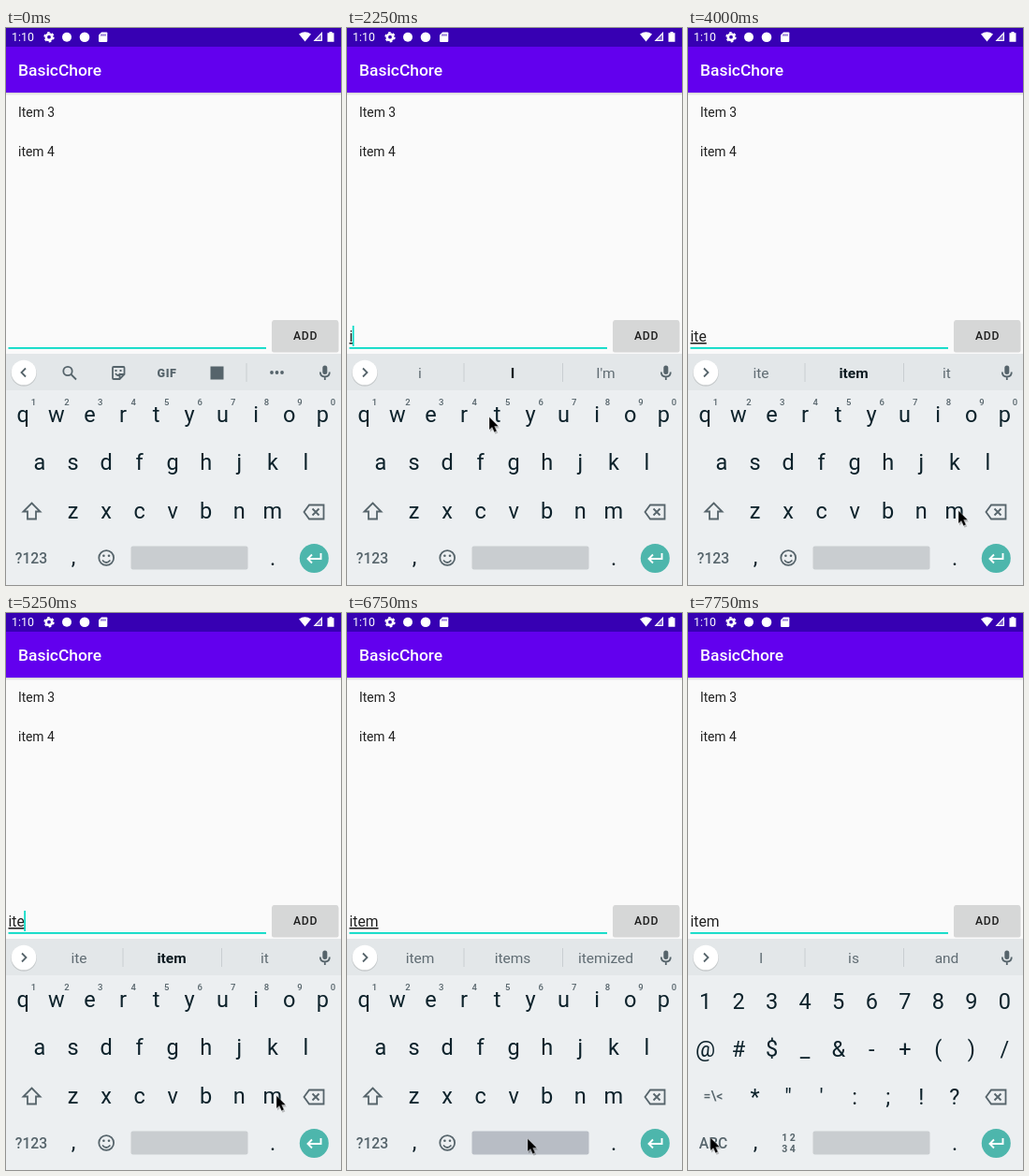
Recreate the animation shown at these times as an HTML page. Size 358 by 595 pixels, loop 8 s.

```html
<!DOCTYPE html>
<html lang="en">
<head>
<meta charset="utf-8">
<title>Todo list</title>
<style>
  html, body { margin: 0; width: 100%; height: 100%; overflow: hidden; background: #fafafa; }
  svg { display: block; width: 100%; height: 100%; font-family: Roboto, sans-serif; }
  .line { fill: none; stroke: #56646b; stroke-width: 1.8; }
  .grey { fill: #56646b; }
  .mid { text-anchor: middle; }
  .key { font-size: 23.5px; fill: #0d222b; }
</style>
</head>
<body>
<svg viewBox="0 0 358 595">
  <defs>
    <linearGradient id="fade" x2="0" y2="1">
      <stop stop-opacity=".16"/><stop offset="1" stop-opacity="0"/>
    </linearGradient>
  </defs>
  <rect width="358" height="595" fill="#fafafa"/>

  <!-- status bar and title -->
  <rect width="358" height="20" fill="#3700b3"/>
  <rect y="20" width="358" height="49" fill="#6200ee"/>
  <rect y="69" width="358" height="3" fill="url(#fade)"/>
  <g fill="#fff">
    <text x="6" y="14" font-size="12.4">1:10</text>
    <circle cx="46" cy="9.7" r="3.2" fill="none" stroke="#fff" stroke-width="2.6"/>
    <circle cx="46" cy="9.7" r="4.9" fill="none" stroke="#fff" stroke-width="1.6" stroke-dasharray="2.6 2.53"/>
    <circle cx="65" cy="9.7" r="5"/>
    <circle cx="84" cy="9.7" r="5.3"/>
    <path d="M102 4.5h5.5q.8 0 .8.8v8.8q0 .8-.8.8h-7.7q-.8 0-.8-.8V7.5z"/>
    <path d="M102 6.5v2m2-2v2m2-2v2" stroke="#3700b3"/>
    <path d="M313 6.5q6.5-4.6 13 0L319.500 14.500z"/>
    <path d="M338 4v10h-9.500z" fill-opacity=".35"/>
    <path d="M338 4v10h-9.500zM336.800 7v5.800h-5.500z" fill-rule="evenodd"/>
    <path d="M343.500 5.200h2V4h3v1.200h2v9.600h-7z"/>
    <text x="13" y="51" font-size="17.4" font-weight="500">BasicChore</text>
  </g>

  <!-- list, input and button -->
  <g font-size="13.9" fill="#202020">
    <text x="13" y="95">Item 3</text>
    <text x="13" y="137">item 4</text>
  </g>
  <text id="typed" x="2.500" y="335" font-size="15.700" fill="#202020"></text>
  <rect x="2.500" y="341" width="275.500" height="1.800" fill="#03dac5"/>
  <rect id="caret" y="318" width="1.700" height="22" fill="#03dac5"/>
  <rect x="284" y="313" width="71.500" height="33.500" rx="2" fill="#000" opacity=".14"/>
  <rect x="284.500" y="312" width="70.500" height="33" rx="2" fill="#d6d7d7"/>
  <text class="mid" x="320" y="332.500" font-size="12.200" font-weight="500" letter-spacing=".7" fill="#202020">ADD</text>

  <!-- keyboard -->
  <rect y="348" width="358" height="247" fill="#eceff1"/>
  <rect y="348" width="358" height="39" fill="#e3e7e9"/>
  <circle cx="19" cy="369" r="13.700" fill="#000" opacity=".13"/>
  <circle cx="19" cy="368" r="13.300" fill="#fff"/>
  <path id="chevron" class="line"/>
  <g id="tools">
    <circle class="line" cx="66" cy="366.500" r="4.700"/>
    <path class="line" d="M69.500 370l5.500 5.500" stroke-width="2"/>
    <path class="line" d="M115 362h10.500q1 0 1 1v7l-5 5H115q-1 0-1-1v-11q0-1 1-1zM126.500 370h-4q-1 0-1 1v4M117 369q2.500 4 5 0" stroke-width="1.500"/>
    <path class="grey" d="M116.500 365h2v2h-2zm5 0h2v2h-2z"/>
    <text class="grey mid" x="172" y="372.500" font-size="12.500" font-weight="900" letter-spacing=".6">GIF</text>
    <rect class="grey" x="218.500" y="361.500" width="14" height="14"/>
    <path d="M257 358v20" stroke="#c9ced1"/>
    <g class="grey"><circle cx="284" cy="368" r="1.900"/><circle cx="289.500" cy="368" r="1.900"/><circle cx="295" cy="368" r="1.900"/></g>
  </g>
  <g id="suggestions" class="mid" font-size="15.500">
    <path d="M125 358v20M230.500 358v20" stroke="#c9ced1"/>
    <text x="78" y="374"></text><text x="177" y="374"></text><text x="276.500" y="374"></text>
  </g>
  <rect class="grey" x="338.300" y="360.500" width="5" height="9.500" rx="2.500"/>
  <path class="line" d="M335.800 367.500q0 5 5 5t5-5M340.800 372.500v3.500" stroke-width="1.500"/>

  <g id="letters">
    <path class="line" d="M27.500 507.500l9 9h-4.500v8h-9v-8h-4.500z"/>
    <text class="grey mid" x="27" y="571.500" font-size="15.700" font-weight="500">?123</text>
    <circle class="line" cx="107.200" cy="566" r="7.900"/>
    <path class="line" d="M103 568.500q4.200 5 8.400 0" stroke-width="1.600"/>
    <g class="grey"><circle cx="104.400" cy="563.800" r="1.300"/><circle cx="110" cy="563.800" r="1.300"/></g>
  </g>
  <g id="symbols">
    <text class="grey mid" x="27" y="521" font-size="14" font-weight="500">=\&lt;</text>
    <text class="grey mid" x="27" y="571.500" font-size="15.700" font-weight="500">ABC</text>
    <g class="grey mid" font-size="10.500" font-weight="700">
      <text x="107.500" y="563.500">1 2</text><text x="107.500" y="576">3 4</text>
    </g>
  </g>
  <text class="key mid" x="72" y="573">,</text>
  <text class="key mid" x="285" y="574">.</text>
  <rect id="space" x="133.500" y="553.500" width="125" height="25" rx="2"/>
  <path class="line" d="M324 509.500h15.500v15H324l-5.500-7.500zM327.500 513.500l7 7m0-7l-7 7" stroke-width="1.600"/>
  <circle cx="329.300" cy="566.500" r="15.500" fill="#4db6ac"/>
  <path d="M336.500 561v6h-14m4.500-4.500l-4.500 4.500 4.500 4.500" fill="none" stroke="#fff" stroke-width="1.900"/>

  <g id="pointer">
    <path d="M1 2v13.500l3.200-2.700 2.300 5 2.800-1.200-2.200-5H11z" opacity=".22"/>
    <path d="M0-.5v13.700l3.100-2.700 2.300 5.200 2.600-1.100-2.300-5.100H10z" stroke="#fff" stroke-opacity=".5" stroke-width=".6"/>
  </g>
</svg>
<script>
const LOOP = 8000, STEP = 250, BLINK = 500, PITCH = 35.55;
const $ = id => document.getElementById(id);

// Each edit restarts the caret blink; "*" marks a bold suggestion.
const edits = [
  { at: -500, text: "" },
  { at: 2000, text: "i", words: ["i", "*I", "I'm"] },
  { at: 2750, text: "it", words: ["it", "it's", "its"] },
  { at: 3250, text: "ite", words: ["ite", "*item", "it"] },
  { at: 6000, text: "item", words: ["item", "items", "itemized"] },
  { at: 7000, text: "item ", words: ["I", "is", "and"], done: true }
];

// Pointer stops: time, x, y
const path = [
  [250, 174, 315], [750, 158, 337], [1250, 146, 354], [1750, 267, 418],
  [2000, 267, 418], [2250, 152, 416], [2500, 152, 416], [3000, 89, 413],
  [3250, 89, 413], [3750, 275, 511], [4000, 289, 516], [6000, 289, 516],
  [6500, 197, 560], [6750, 193, 562], [7000, 193, 562], [7500, 24, 561], [LOOP, 24, 561]
];

function addText(parent, text, x, y, attrs) {
  const node = document.createElementNS("http://www.w3.org/2000/svg", "text");
  for (const [name, value] of Object.entries({ x, y, ...attrs })) node.setAttribute(name, value);
  node.textContent = text;
  parent.append(node);
}

function addRow(parent, keys, x, y, attrs = { class: "key mid" }) {
  [...keys].forEach((key, i) => addText(parent, key, x + i * PITCH, y, attrs));
}

addRow($("letters"), "qwertyuiop", 18.3, 420.5);
addRow($("letters"), "asdfghjkl", 36, 472);
addRow($("letters"), "zxcvbnm", 71.5, 523.5);
addRow($("letters"), "1234567890", 29.5, 403, { class: "grey mid", "font-size": 9.5, "font-weight": 500 });
addRow($("symbols"), "1234567890", 18.5, 422.5);
addRow($("symbols"), "@#$_&-+()/", 18.5, 473.5);
addRow($("symbols"), "*\"':;!?", 71.5, 525);

const show = (node, on) => node.setAttribute("visibility", on ? "visible" : "hidden");

function pointerAt(t) {
  const next = Math.max(1, path.findIndex(p => p[0] >= t));
  const [t0, x0, y0] = path[next - 1], [t1, x1, y1] = path[next];
  const k = (t - t0) / (t1 - t0);
  return [x0 + (x1 - x0) * k, y0 + (y1 - y0) * k];
}

function draw(t) {
  const edit = edits.findLast(e => e.at <= t);
  const { text, words } = edit;
  const typed = $("typed");
  typed.textContent = text.trim();
  typed.setAttribute("text-decoration", edit.done ? "none" : "underline");
  const width = text ? typed.getComputedTextLength() + (edit.done ? 3.9 : 0) : 0;
  $("caret").setAttribute("x", 2 + width);
  show($("caret"), Math.floor((t - edit.at) / BLINK) % 2 === 0);

  show($("tools"), !words);
  show($("suggestions"), words);
  $("suggestions").querySelectorAll("text").forEach((node, i) => {
    const word = words ? words[i] : "", bold = word.startsWith("*");
    node.textContent = word.replace("*", "");
    node.setAttribute("font-weight", bold ? 700 : 400);
    node.setAttribute("fill", bold ? "#0d1a20" : "#606c73");
  });
  $("chevron").setAttribute("d", words ? "M17 363.500l4.500 4.500-4.500 4.500" : "M21 363.500l-4.500 4.500 4.500 4.500");

  const symbols = t >= 7750;
  show($("letters"), !symbols);
  show($("symbols"), symbols);
  $("space").setAttribute("fill", t >= 6750 && t < 7000 ? "#b8bdc5" : "#c9cdd0");

  show($("pointer"), t >= path[0][0]);
  $("pointer").setAttribute("transform", `translate(${pointerAt(t)})`);
}

function frame() {
  draw(Math.floor(performance.now() % LOOP / STEP) * STEP);
  requestAnimationFrame(frame);
}
frame();
</script>
</body>
</html>
```
